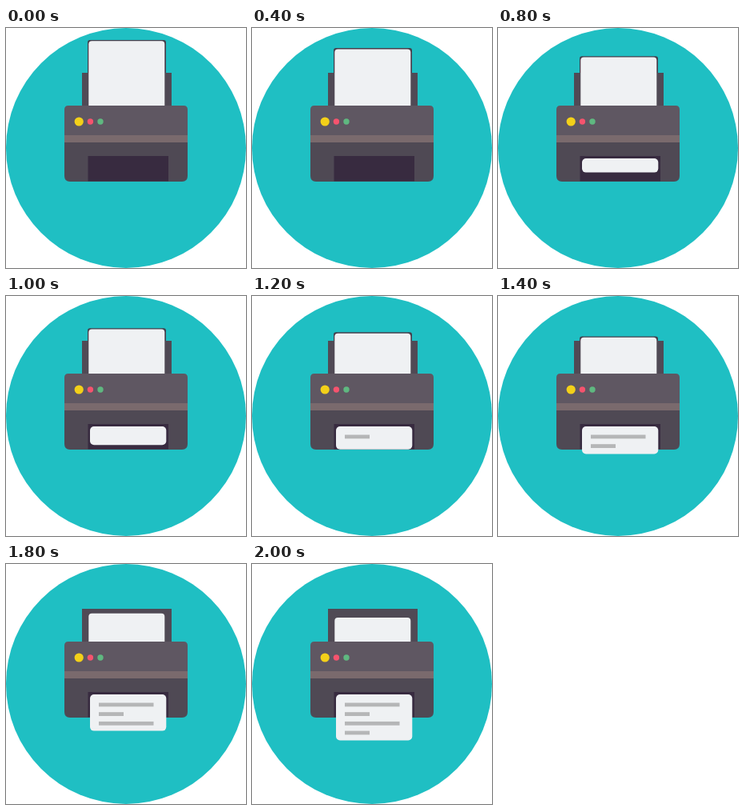
An HTML page for the animation above (2200 ms loop, 300 by 300 pixels).

```html
<!DOCTYPE html>
<html lang="en">
<head>
<meta charset="utf-8">
<title>Printer</title>
<style>
  html, body { margin: 0; width: 100%; height: 100%; overflow: hidden; background: #fff; }
  svg { display: block; width: 100%; height: 100%; }
</style>
</head>
<body>
<svg viewBox="0 0 300 300">
  <circle cx="150" cy="150" r="150" fill="#1fbfc3"/>
  <rect id="edge" x="102" width="98" rx="3" fill="#443f4c"/>
  <path d="M95 56H207V100H95Z" fill="#504a55"/>
  <rect id="feed" x="103.3" width="95" rx="4" fill="#eff1f3"/>

  <path d="M73 135V102Q73 97 78 97H222Q227 97 227 102V135Z" fill="#5f5762"/>
  <path d="M73 142H227V185Q227 192 220 192H80Q73 192 73 185Z" fill="#4f4954"/>
  <path d="M73 134H227V143H73Z" fill="#7a6a6d"/>
  <path d="M102.5 160H203V191.5H102.5Z" fill="#382b40"/>

  <circle cx="91.2" cy="117" r="5.6" fill="#f3d019"/>
  <circle cx="105.4" cy="117" r="3.7" fill="#f6536e"/>
  <circle cx="118" cy="117" r="3.7" fill="#5fb880"/>

  <rect id="sheet" x="105" y="163" width="95.3" rx="5" fill="#eff1f3"/>
  <g id="lines" fill="#b5b6b7"></g>
</svg>
<script>
  const STEP = 200, STEPS = 11;
  const SHORT = 31, FULL = 68.5;
  const $ = id => document.getElementById(id);
  const set = (el, attrs) => {
    for (const name in attrs) el.setAttribute(name, attrs[name]);
  };

  // Each text line lists the [step, width] changes of its printing.
  const prints = [
    [[6, SHORT], [7, FULL]],
    [[7, SHORT]],
    [[8, SHORT], [9, FULL]],
    [[10, SHORT]]
  ];
  const lines = prints.map((_, i) => {
    const line = document.createElementNS('http://www.w3.org/2000/svg', 'rect');
    set(line, { x: 116, y: 173.5 + i * 11.7, height: 4.8 });
    $('lines').append(line);
    return line;
  });

  function sheetHeight(step) {
    if (step < 3) return 0;
    if (step === 10) return 57.5;
    return 12 + (step - 3) * 5.6;
  }

  function draw(step) {
    const top = 16.3 + step * 5.06;
    set($('edge'), { y: top - 1.3, height: 101 - top });
    set($('feed'), { y: top, height: 104 - top });
    set($('sheet'), { height: sheetHeight(step) });
    lines.forEach((line, i) => {
      const width = prints[i].reduce((w, [at, next]) => step >= at ? next : w, 0);
      set(line, { width });
    });
  }

  const start = performance.now();
  function tick() {
    draw(Math.floor((performance.now() - start) / STEP) % STEPS);
    requestAnimationFrame(tick);
  }
  tick();
</script>
</body>
</html>
```
